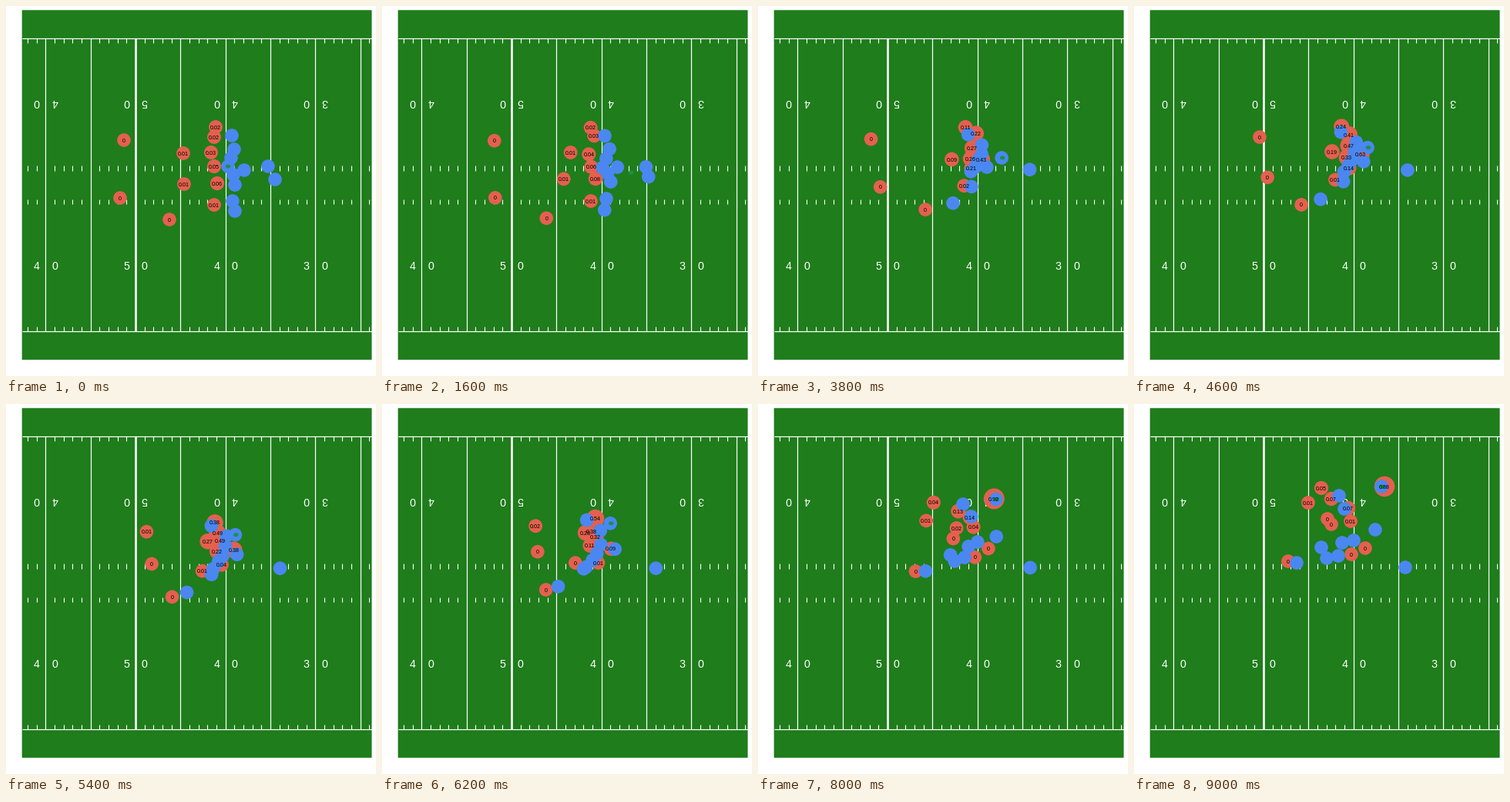
Animation of 480 by 480 pixels, one loop 9.2 s. Source, as a matplotlib script:

```python
import numpy as np
import matplotlib.pyplot as plt
from matplotlib.animation import FuncAnimation
from matplotlib.patches import Circle, Ellipse, Rectangle

SIZE, FRAMES, INTERVAL = 480, 46, 200
GRASS, RED, BLUE, BALL = "#1f7d1b", "#e4604f", "#4b87f0", "#169448"
PT = 0.72  # points per pixel at 100 dpi
FONT = "Liberation Sans"
RADIUS = 8.8
SET_UNTIL, SNAP, CATCH = 2, 5, 10  # frames

fig = plt.figure(figsize=(SIZE / 100, SIZE / 100), dpi=100, facecolor="white")
ax = fig.add_axes([0, 0, 1, 1])
ax.set_xlim(0, SIZE)
ax.set_ylim(SIZE, 0)
ax.axis("off")

# ---- field ----
LEFT, RIGHT, TOP, BOTTOM = 20.7, 474.5, 41.6, 421.6
FIRST, YARD = 51.3, 58.33 / 5


def line(x0, y0, x1, y1, width=1.2):
    ax.plot([x0, x1], [y0, y1], color="white", lw=width * PT,
            solid_capstyle="butt", zorder=1)


def digit(x, y, char, flipped=False):
    ax.text(x, y, char, color="white", fontsize=14.2 * PT, family=FONT,
            ha="center", va="baseline", rotation=180 if flipped else 0,
            rotation_mode="anchor", zorder=1)


ax.add_patch(Rectangle((LEFT, 5.3), RIGHT - LEFT, 453.6, color=GRASS,
                       lw=0, zorder=0, snap=False))
for y in (TOP, BOTTOM):
    line(LEFT, y, RIGHT, y)
for n in range(-2, 37):
    x = FIRST + n * YARD
    if n % 5 == 0:
        line(x, TOP, x, BOTTOM, 2.6 if n == 10 else 1.2)
    else:
        for y, height in ((TOP, 6), (207, 6.5), (250.5, 6.5), (BOTTOM - 6, 6)):
            line(x, y, x, y + height, 1.1)
for n, tens in enumerate("4543"):
    x = FIRST + n * 10 * YARD
    for side, bottom, top in ((-11.5, tens, "0"), (11.9, "0", tens)):
        digit(x + side, 342.5, bottom)
        digit(x + side, 120.7, top, flipped=True)


# ---- motion ----
def route(points):
    """Smooth path through evenly timed points, starting from rest."""
    points = np.array(points, float)
    last = len(points) - 1
    slope = np.gradient(points, axis=0)
    slope[0] = 0
    t = np.clip((np.arange(FRAMES) - SET_UNTIL) / (FRAMES - 1 - SET_UNTIL), 0, 1) * last
    i = np.minimum(t.astype(int), last - 1)
    u = (t - i)[:, None]
    return ((1 + 2 * u) * (1 - u) ** 2 * points[i] + u * (1 - u) ** 2 * slope[i]
            + u * u * (3 - 2 * u) * points[i + 1] + u * u * (u - 1) * slope[i + 1])


def tackle_odds(tackler, runner):
    """High when close to the runner, low once the runner has gone past."""
    gap = np.hypot(*(tackler - runner).T)
    ahead = runner[:, 1] - tackler[:, 1]
    return np.exp(-(gap / 32) ** 1.2) / (1 + np.exp(-(ahead + 25) / 8))


def dot(color, layer):
    return ax.add_patch(Circle((0, 0), RADIUS, color=color, lw=0, zorder=layer))


class Blocker:
    def __init__(self, *points):
        self.path = route(points)
        self.dot = dot(BLUE, 3)

    def show(self, f):
        self.dot.center = self.path[f]


class Tackler:
    def __init__(self, *points):
        self.path = route(points)
        self.odds = tackle_odds(self.path, runner.path)
        self.dot = dot(RED, 2)
        self.label = ax.text(0, 0, "", fontsize=7.2 * PT, family=FONT, color="black",
                             ha="center", va="baseline", zorder=5)

    def show(self, f):
        x, y = self.path[f]
        self.dot.center = x, y
        self.dot.radius = RADIUS + 5.1 * self.odds[f]
        self.label.set_position((x, y + 2.6))
        self.label.set_text(f"{round(self.odds[f], 2):g}")


runner = Blocker((349, 225), (338, 214), (302, 182), (298, 143), (321, 107))
center = Blocker((288, 208), (272, 215), (250, 200))
offense = [
    runner, center,
    Blocker((340, 208), (355, 213), (352, 212)),  # quarterback
    Blocker((309, 213), (286, 187), (285, 177)),
    Blocker((293, 168), (268, 163), (266, 119)),
    Blocker((296, 186), (288, 176), (273, 136)),
    Blocker((292, 197), (283, 199), (270, 180)),
    Blocker((295, 219), (278, 206), (265, 197)),
    Blocker((297, 232), (298, 201), (313, 163)),
    Blocker((294, 253), (271, 227), (243, 186)),
    Blocker((297, 266), (241, 250), (211, 206)),
]
defense = [
    # secondary
    Tackler((153, 174), (140, 174), (198, 159), (243, 109)),
    Tackler((148, 249), (152, 241), (201, 193), (226, 128)),
    Tackler((212, 277), (217, 257), (200, 204)),
    # linebackers
    Tackler((230, 191), (275, 186), (277, 173), (281, 152)),
    Tackler((231, 231), (248, 205), (264, 168), (256, 123)),
    # front
    Tackler((272, 157), (269, 158), (276, 149), (325, 107)),
    Tackler((270, 170), (284, 165), (272, 166), (278, 135)),
    Tackler((266, 190), (276, 196), (251, 149)),
    Tackler((270, 208), (279, 210), (282, 195)),
    Tackler((274, 230), (294, 192), (300, 187)),
    Tackler((270, 258), (270, 238), (251, 207), (256, 156)),
]

# The ball flies from the center to the runner, who then carries it.
flight = np.clip((np.arange(FRAMES) - SNAP) / (CATCH - SNAP), 0, 1)[:, None]
ball_path = center.path[0] + flight * (runner.path + (1, 0) - center.path[0])
ball = ax.add_patch(Ellipse((0, 0), 6.5, 5, color=BALL, lw=0, zorder=4))


def draw(f):
    for player in offense + defense:
        player.show(f)
    ball.center = ball_path[f]
    return []


anim = FuncAnimation(fig, draw, frames=FRAMES, interval=INTERVAL,
                     repeat=True, repeat_delay=0, blit=False)
plt.show()
```
